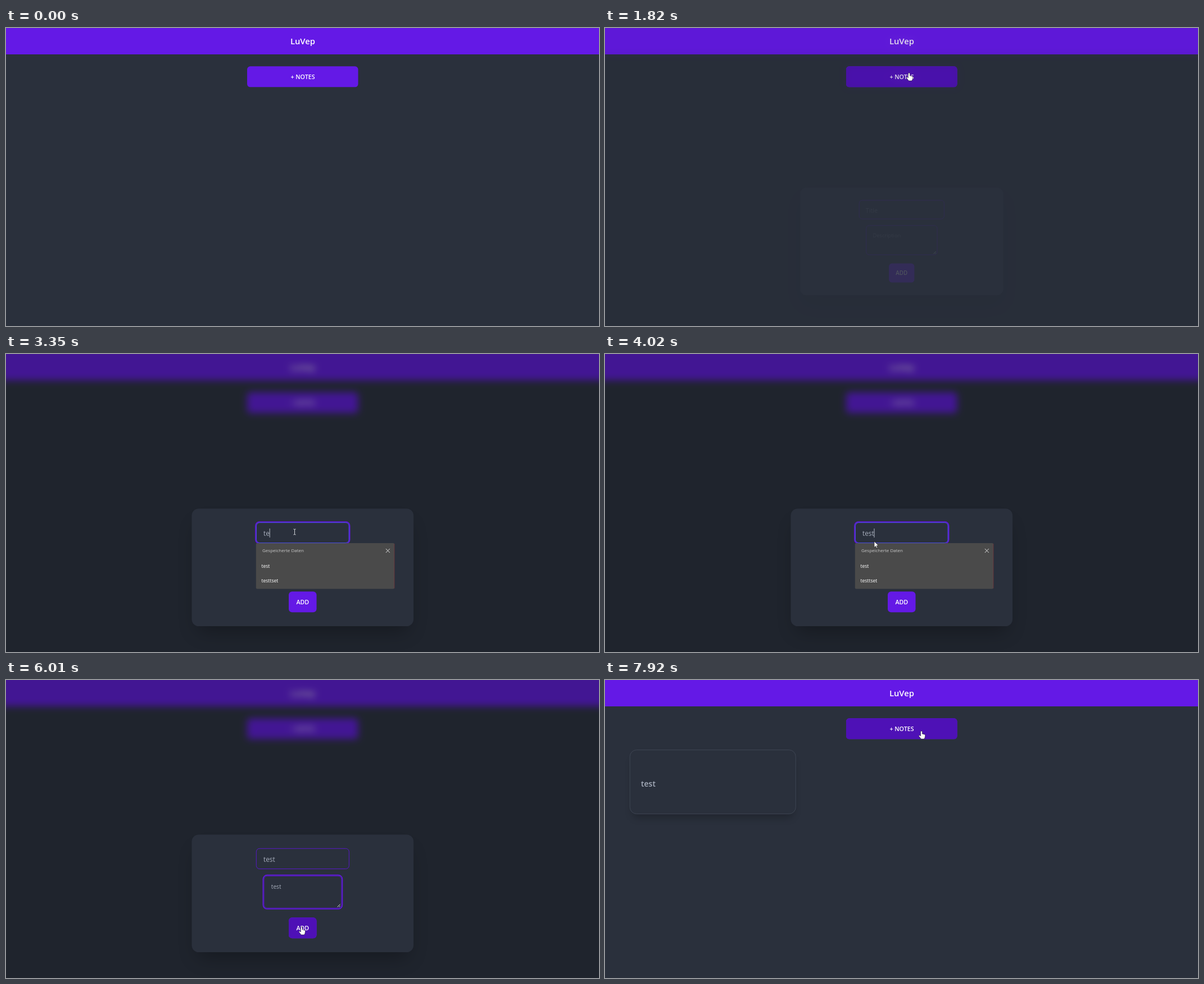
An HTML page that plays this animation: 1055x531 px, repeating every 7990 ms.

```html
<!DOCTYPE html>
<html lang="en">
<head>
<meta charset="utf-8">
<title>Notes</title>
<style>
  html, body { margin: 0; width: 100%; height: 100%; overflow: hidden; background: #2a303c; }
  svg { display: block; width: 100%; height: 100%; }
  text { font-family: "Open Sans", "Noto Sans", sans-serif; white-space: pre; }
  .bold { font-weight: 600; fill: #fff; }
  .mid { text-anchor: middle; }
  .label { font-size: 10.7px; }
  .primary { fill: #6419e6; }
  .focus { fill: #4e11b6; }
  .field { fill: #2a303c; stroke: #5719c6; }
  .ring { fill: none; stroke: #6419e6; stroke-width: 1.6; }
  .caret { stroke: #b4bac6; }
  .row { font-size: 8.6px; fill: #fff; }
</style>
</head>
<body>
<svg viewBox="0 0 1055 531" preserveAspectRatio="none">
  <defs>
    <filter id="blur" filterUnits="userSpaceOnUse" x="-40" y="-40" width="1135" height="611" color-interpolation-filters="sRGB">
      <feGaussianBlur stdDeviation="6.2"/>
    </filter>
    <filter id="deep" x="-30%" y="-50%" width="160%" height="200%"><feGaussianBlur stdDeviation="17"/></filter>
    <filter id="soft" x="-20%" y="-40%" width="140%" height="180%"><feGaussianBlur stdDeviation="7"/></filter>
  </defs>

  <g id="page">
    <rect x="-40" y="-40" width="1135" height="611" fill="#2a303c"/>
    <rect class="primary" x="-40" y="-40" width="1135" height="87"/>
    <text class="bold mid" x="528" y="29" font-size="14.8">LuVep</text>
    <rect class="primary" x="429" y="68.3" width="197.5" height="37" rx="5.5"/>
    <rect id="notesHover" class="focus" x="429" y="68.3" width="197.5" height="37" rx="5.5"/>
    <text class="bold mid label" x="528" y="91.2">+ NOTES</text>
    <g id="card">
      <rect x="48" y="140" width="288" height="106" rx="12" opacity=".22" filter="url(#soft)"/>
      <rect x="44.3" y="124.6" width="295" height="114" rx="12" fill="#2a303c" stroke="#3e4553"/>
      <text x="64" y="190.3" font-size="14" font-weight="600" fill="#a6adbb">test</text>
    </g>
  </g>

  <g id="overlay">
    <use href="#page" filter="url(#blur)"/>
    <rect width="1055" height="531" fill="#111318" opacity=".4"/>
    <g id="dialog">
      <rect x="340" y="304" width="376" height="191" rx="12" opacity=".27" filter="url(#deep)"/>
      <rect x="330.5" y="275.5" width="394.5" height="209.5" rx="12.3" fill="#2a303c"/>
      <rect class="field" x="445.3" y="300.3" width="165" height="36.2" rx="5.8"/>
      <g id="titleRing">
        <rect class="ring" x="444" y="299" width="167.6" height="38.8" rx="7" stroke-width="3"/>
        <rect x="445.5" y="300.5" width="164.6" height="36" rx="5.8" fill="none" stroke="#4a4fe0"/>
      </g>
      <text id="titleText" x="458" y="323.8" font-size="11.8"></text>
      <path id="titleCaret" class="caret" d="M0 311V327"/>
      <rect class="field" x="459" y="349.3" width="137.8" height="57" rx="5.8"/>
      <rect id="descRing" class="ring" x="457.4" y="347.6" width="141" height="60.4" rx="7.2"/>
      <text id="descText" x="471.8" y="372" font-size="10.2"></text>
      <path id="descCaret" class="caret" d="M0 361V375"/>
      <path d="M589.5 404.5l5-5M592.5 404.5l2-2" stroke="#d5d8de" fill="none"/>
      <rect class="primary" x="503" y="423.2" width="49.5" height="37" rx="6"/>
      <rect id="addHover" class="focus" x="503" y="423.2" width="49.5" height="37" rx="6"/>
      <text class="bold mid label" x="527.8" y="445.8">ADD</text>
    </g>
  </g>

  <g id="popup">
    <rect id="popupBox" x="444.8" y="337" width="246" rx="2" fill="#4a4a4a"/>
    <path id="popupEdge" stroke="#7a3c3e" stroke-width=".8"/>
    <text x="456" y="353.4" font-size="8" fill="#c9c9c9">Gespeicherte Daten</text>
    <path d="M675.8 347l7 7m0-7l-7 7" stroke="#e2e2e2" fill="none"/>
    <g id="rows"></g>
  </g>

  <circle id="click" r="9.6" fill="#b5b212" opacity=".85"/>
  <g id="cursor">
    <path id="arrow" d="M0 0V10.6L2.5 8.3 4 11.8 5.6 11.1 4.1 7.6H7.3Z" fill="#fff" stroke="#111" stroke-width=".5"/>
    <path id="hand" d="M-1.4 1.3a1.4 1.4 0 0 1 2.8 0V5l4 .9q1.4.4 1.3 2l-.6 3.6L4.8 14H-.6L-4.4 9.2q-.6-1 .3-1.5.9-.4 1.7.4l1 1z" fill="#fff" stroke="#111" stroke-width=".5"/>
    <path id="beam" d="M-2-5Q0-5 0-4V4Q0 5-2 5M2-5Q0-5 0-4M0 4Q0 5 2 5" fill="none" stroke="#e4e6ea" stroke-width=".9"/>
  </g>
</svg>
<script>
const LOOP = 7990;
const $ = id => document.getElementById(id);
const show = (id, on) => $(id).style.display = on ? '' : 'none';

// Pointer track: time, x, y
const track = [
  [630, 1010, 529], [1000, 770, 290], [1280, 552, 98], [1430, 541, 80], [2220, 541, 80],
  [2290, 540, 112], [2480, 537, 220], [2680, 526, 305], [2820, 513.5, 317], [3930, 513.5, 317],
  [4180, 372, 387], [4300, 370, 390], [4400, 384, 391], [4640, 498, 375], [4810, 498, 375],
  [5080, 417, 388], [5460, 417, 388], [5600, 432, 391], [5880, 514, 434], [6070, 526, 440],
  [6340, 526, 440], [6650, 511, 423], [6900, 511, 423], [7130, 510, 401], [7330, 555, 338],
  [7500, 589, 187], [7580, 580, 150], [7720, 567, 100], [7850, 563, 91], [7990, 563, 91]
];
const shapes = [
  [0, ''], [630, 'arrow'], [1290, 'hand'], [2600, 'arrow'], [2700, 'beam'], [4000, 'arrow'],
  [4570, 'beam'], [4900, 'arrow'], [5860, 'hand'], [6400, 'arrow'], [7710, 'hand']
];
const clicks = [[1660, 1790], [2830, 2960], [4230, 4360], [4670, 4820], [6130, 6340]];
const titleKeys = [3170, 3300, 3480, 3620];
const descKeys = [5020, 5160, 5320, 5450];
const saved = ['test', 'testtset', 'asd', 'abc', 'note', 'hallo'];

$('rows').innerHTML = saved.map((s, i) =>
  `<text class="row" x="454.4" y="${380.6 + 26 * i}">${s}</text>`).join('');

const ramp = (t, start, span) => {
  const u = Math.min(1, Math.max(0, (t - start) / span));
  return u * u * (3 - 2 * u);
};
const within = (t, a, b) => t >= a && t < b;

function slope(i, k) {
  const a = track[i - 1], b = track[i], c = track[i + 1];
  if (!a || !c) return 0;
  const before = b[k] - a[k], after = c[k] - b[k];
  return before * after <= 0 ? 0 : (before + after) / (c[0] - a[0]);
}

function pointer(t) {
  let i = 0;
  while (i < track.length - 2 && t >= track[i + 1][0]) i++;
  const a = track[i], b = track[i + 1], span = b[0] - a[0];
  const u = Math.max(0, (t - a[0]) / span), v = 1 - u;
  return [1, 2].map(k =>
    v * v * (1 + 2 * u) * a[k] + u * u * (3 - 2 * u) * b[k] +
    span * u * v * (v * slope(i, k) - u * slope(i + 1, k)));
}

function input(name, hint, keys, t, from, to) {
  const text = 'test'.slice(0, keys.filter(k => t >= k).length);
  const node = $(name + 'Text'), focused = within(t, from, to);
  node.textContent = text || hint;
  node.setAttribute('fill', text ? '#a6adbb' : '#686e7a');
  show(name + 'Ring', focused);
  const start = Math.max(from, ...keys.filter(k => t >= k));
  show(name + 'Caret', focused && (t - start) % 1060 < 530);
  const x = +node.getAttribute('x') + (text ? node.getComputedTextLength() : 0);
  $(name + 'Caret').setAttribute('transform', `translate(${x + .4} 0)`);
}

function popup(t) {
  const count = t < titleKeys[0] ? saved.length : 2;
  const height = 29.5 + 26 * count;
  show('popup', within(t, 2900, 4240));
  $('popupBox').setAttribute('height', height);
  $('popupEdge').setAttribute('d', `M690.8 338V${336 + height}`);
  [...$('rows').children].forEach((row, i) => row.style.display = i < count ? '' : 'none');
}

function draw(t) {
  const open = ramp(t, 1765, 220) - ramp(t, 6340, 200);
  show('card', t >= 6400);
  $('notesHover').setAttribute('opacity',
    ramp(t, 1290, 160) - ramp(t, 1830, 170) + ramp(t, 7710, 180));
  $('addHover').setAttribute('opacity', ramp(t, 5860, 160));

  show('overlay', open > 0);
  $('overlay').setAttribute('opacity', open);
  $('dialog').setAttribute('transform',
    `translate(527.75 380.2) scale(${.9 + .1 * open}) translate(-527.75 -380.2)`);
  input('title', 'Title', titleKeys, t, 2830, 4240);
  input('desc', 'Description', descKeys, t, 4670, 6340);
  popup(t);

  const [x, y] = pointer(t);
  const shape = shapes.filter(s => t >= s[0]).pop()[1];
  for (const id of ['arrow', 'hand', 'beam']) show(id, id === shape);
  $('cursor').setAttribute('transform', `translate(${x} ${y})`);
  show('click', clicks.some(c => within(t, ...c)));
  $('click').setAttribute('transform', `translate(${x - 1} ${y - 1})`);
}

const begin = performance.now();
function tick() {
  draw((performance.now() - begin) % LOOP);
  requestAnimationFrame(tick);
}
tick();
</script>
</body>
</html>
```
